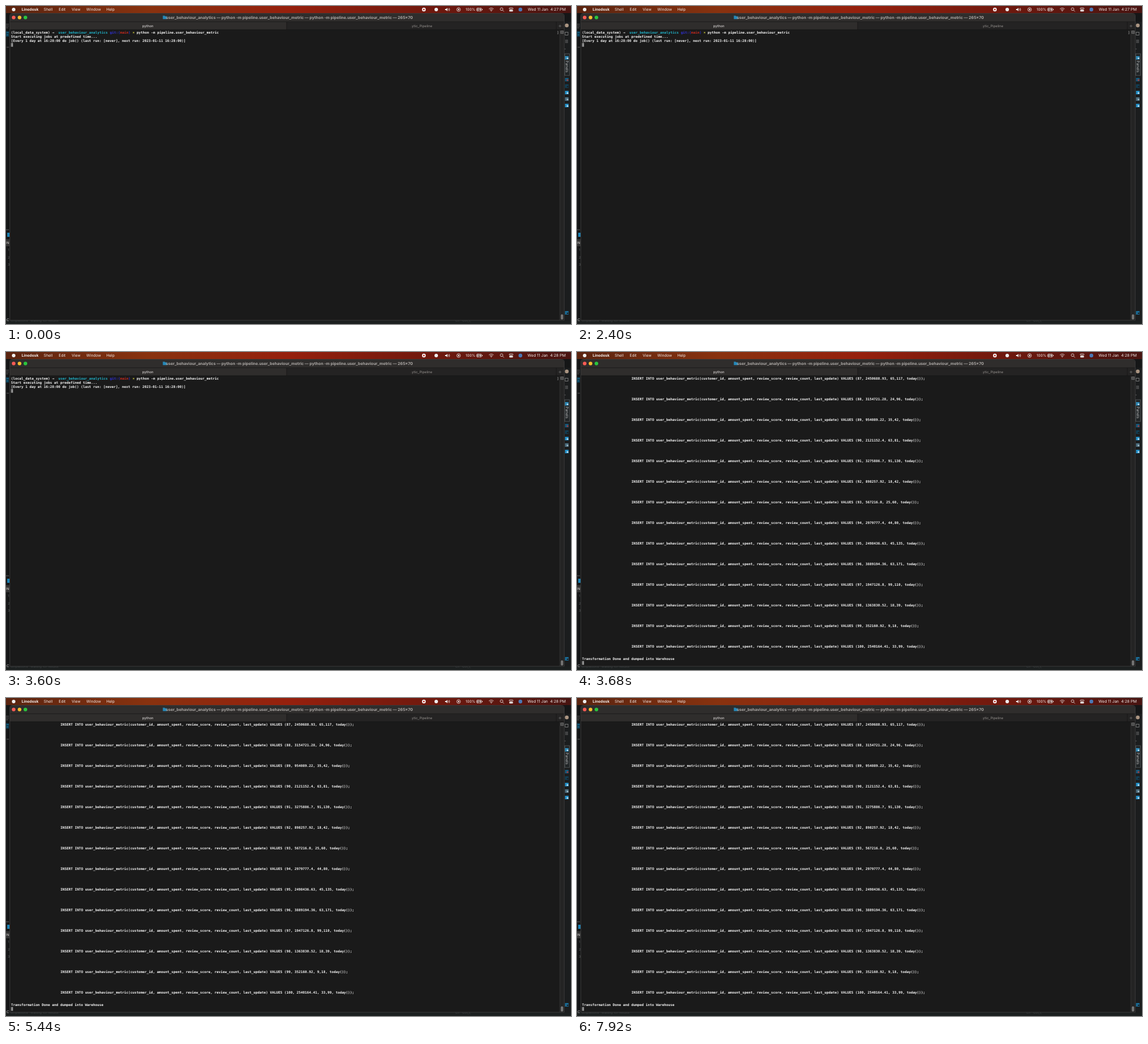
Recreate the animation shown at these times as an HTML page. Size 960 by 540 pixels, loop 8 s.

```html
<!DOCTYPE html>
<html lang="en">
<head>
<meta charset="utf-8">
<title>Scheduled job</title>
<style>
  html, body { margin: 0; width: 100%; height: 100%; overflow: hidden; background: #151617; }
  svg { display: block; width: 960px; height: 540px; }
  text { font: 6.5px Inter, "Open Sans", sans-serif; fill: #f2eeec; white-space: pre; text-rendering: geometricPrecision; }
  #screen text { font: bold 5.815px "DejaVu Sans Mono", "Liberation Mono", monospace; fill: #f4f4f4; }
  #menu .app { font-weight: 700; }
  .title { font-size: 6.72px; font-weight: 700; fill: #aeaaa7; }
  .tab { font-size: 5.8px; }
  .dim { font-size: 5.6px; fill: #55595b; }
  .line { fill: none; stroke: #eee; stroke-width: .8; }
</style>
</head>
<body>
<svg viewBox="0 0 960 540">
  <defs>
    <linearGradient id="bar">
      <stop offset="0" stop-color="#5a2410"/>
      <stop offset=".25" stop-color="#88320f"/>
      <stop offset=".5" stop-color="#96200d"/>
      <stop offset=".75" stop-color="#70190e"/>
      <stop offset="1" stop-color="#481411"/>
    </linearGradient>
  </defs>

  <!-- desktop behind the window -->
  <rect width="960" height="540" fill="#151617"/>
  <rect y="534" width="960" height="6" fill="#1c2020"/>
  <g id="edge">
    <path d="M0 31H5M0 34H5M0 37H4" stroke="#777" stroke-width=".7"/>
    <rect y="43" width="5" height="9" fill="#0c3a50"/>
    <path d="M1 45H5M1 49H4" stroke="#2583ad" stroke-width=".8"/>
    <path d="M1 70H5M0 380H5" stroke="#777" stroke-width=".7"/>
    <rect x="2" y="385" width="4" height="7" fill="#1c82b4"/>
    <rect y="396" width="6" height="12" fill="#333"/>
    <text x="1" y="403.7" style="font-size:5.5px">N</text>
    <text class="dim" x="3" y="416">1</text>
    <text class="dim" x="3" y="429">2</text>
    <text class="dim" x="3" y="441">3</text>
  </g>
  <text class="dim" x="8" y="536" fill-opacity=".6">ompletions   waiting for results</text>
  <text class="dim" x="764" y="536" fill-opacity=".6">Ln   Col_1,</text>

  <!-- menu bar -->
  <g id="menu">
    <rect width="960" height="12" fill="url(#bar)"/>
    <circle cx="13" cy="6" r="3" fill="#eee"/>
    <text class="app" x="26.5" y="8.2">Linedesk</text>
    <text x="64" y="8.2">Shell</text>
    <text x="89.5" y="8.2">Edit</text>
    <text x="111.5" y="8.2">View</text>
    <text x="136.5" y="8.2">Window</text>
    <text x="170.5" y="8.2">Help</text>
    <circle cx="710" cy="6" r="3.2" fill="#f2f2f2"/>
    <rect x="708.8" y="4.8" width="2.4" height="2.4" fill="#c1271b"/>
    <circle cx="731" cy="6" r="3" fill="#eee"/>
    <path d="M746 5H748L750 3V9L748 7H746Z" fill="#eee"/>
    <path class="line" d="M751.3 4.5Q752.5 6 751.3 7.5M752.8 3.4Q755 6 752.8 8.6"/>
    <circle class="line" cx="769" cy="6" r="3.1"/>
    <path d="M768 4.3L771 6L768 7.7Z" fill="#eee"/>
    <text x="781" y="8.2" style="font-size:6.2px">100%</text>
    <rect class="line" x="799.7" y="3.6" width="8.4" height="4.8" rx="1.3"/>
    <rect x="800.8" y="4.7" width="6.2" height="2.6" fill="#ddd"/>
    <path d="M809.4 5V7" class="line"/>
    <path d="M804.5 3.5L802.6 6.4H805.2L803.4 9" fill="none" stroke="#4b1a12" stroke-width=".8"/>
    <path class="line" d="M820.5 5Q824.5 1.8 828.5 5M822 6.6Q824.5 4.6 827 6.6"/>
    <path d="M823.2 7.8Q824.5 6.8 825.8 7.8L824.5 9Z" fill="#eee"/>
    <path class="line" d="M843.8 7.2L846 9.4"/>
    <circle class="line" cx="842" cy="5.3" r="2.3"/>
    <rect class="line" x="855" y="3.2" width="6.5" height="2.2" rx="1.1"/>
    <rect x="855" y="6.5" width="6.5" height="2.7" rx="1.3" fill="#eee"/>
    <circle cx="874" cy="6" r="3.2" fill="#4b78b5"/>
    <text id="clock" x="951" y="8.2" text-anchor="end" style="font-size:6.65px"></text>
  </g>

  <!-- side panel -->
  <g id="panel">
    <rect x="949" y="27" width="11" height="507" fill="#1b1d1e"/>
    <circle cx="952.8" cy="33" r="3.2" fill="#aa9481"/>
    <rect x="950" y="44.5" width="5" height="5" fill="none" stroke="#888" stroke-width=".8"/>
    <path d="M950 58H955M950 60H955M950 62H955" stroke="#888" stroke-width=".7"/>
    <path d="M949 73H951" stroke="#777" stroke-width=".7"/>
    <rect x="949.5" y="81" width="8" height="37" fill="#202426" stroke="#606466" stroke-width=".7"/>
    <text transform="translate(950.6 92.5) rotate(90)" style="font-size:6.5px;fill:#bbb">Panels</text>
  </g>

  <!-- window -->
  <path d="M6.5 533.7V17Q6.5 12.5 11 12.5H943.5Q948.5 12.5 948.5 17V533.7Z" fill="#1a1a1a" stroke="#404040" stroke-width=".8"/>
  <path d="M7 40V17Q7 13 11 13H943.5Q948 13 948 17V40Z" fill="#2f2d2c"/>
  <path d="M477 27H948V40H477Z" fill="#242323"/>
  <path d="M7 26.8H948M7 40.3H948M476.8 27V40M935 27V40" stroke="#151515" stroke-width=".7"/>
  <circle cx="13" cy="19.5" r="3.1" fill="#fc5b55"/>
  <circle cx="23" cy="19.5" r="3.1" fill="#fcbb2d"/>
  <circle cx="33" cy="19.5" r="3.1" fill="#2ac53e"/>
  <path d="M266.5 16.5H269.5L270.4 17.4H273.5V22.3H266.5Z" fill="#2588b8"/>
  <text class="title" x="481.5" y="21.9" text-anchor="middle">user_behaviour_analytics — python -m pipeline.user_behaviour_metric — python -m pipeline.user_behaviour_metric — 265×70</text>
  <text class="tab" x="241" y="35.8" text-anchor="middle">python</text>
  <text class="tab" x="706" y="35.8" text-anchor="middle" style="fill:#96928f">.ytic_Pipeline</text>
  <path d="M939 34H943.6M941.3 31.7V36.3" stroke="#777" stroke-width=".7"/>
  <rect x="941" y="41" width="7" height="492" fill="#242424"/>
  <path d="M941 41V533" stroke="#3c3c3c" stroke-width=".7"/>
  <rect x="942.8" y="42.3" width="4" height="4.4" fill="none" stroke="#8a8a8a" stroke-width=".8"/>
  <path d="M943 44.5H946.6" stroke="#8a8a8a" stroke-width=".7"/>
  <rect x="942.7" y="523.5" width="4" height="9" rx="2" fill="#777"/>
  <text x="1" y="535.3" style="font-size:6px;fill:#ccc">C</text>

  <g id="screen">
    <g id="waiting"></g>
    <g id="done"></g>
    <rect id="cursor" x="8.5" width="3.5" height="6.4" fill="#8c8c8c"/>
  </g>
</svg>
<script>
const LOOP = 8000, MINUTE_AT = 2960, OUTPUT_AT = 3680;
const CELL = 3.5, LINE = 7, LEFT = 8.5, BASE = 47.1;
const $ = id => document.getElementById(id);

function add(parent, tag, attrs, content = "") {
  const el = document.createElementNS("http://www.w3.org/2000/svg", tag);
  for (const key in attrs) el.setAttribute(key, attrs[key]);
  el.textContent = content;
  return parent.appendChild(el);
}

function print(parent, col, row, content, color = "#f4f4f4") {
  add(parent, "text", { x: LEFT + col * CELL, y: BASE + row * LINE, style: `fill:${color}` }, content);
}

// prompt and schedule
const waiting = $("waiting"), done = $("done");
print(waiting, 0, 0, "(local_data_system)");
print(waiting, 20, 0, "→");
print(waiting, 23, 0, "user_behaviour_analytics", "#20b2c8");
print(waiting, 48, 0, "git:(", "#3030d8");
print(waiting, 53, 0, "main", "#c92a20");
print(waiting, 57, 0, ")", "#3030d8");
print(waiting, 59, 0, "×", "#c9c53a");
print(waiting, 61, 0, "python -m pipeline.user_behaviour_metric");
print(waiting, 265, 0, "]", "#999");
print(waiting, 0, 1, "Start executing jobs at predefined time...");
print(waiting, 0, 2, "[Every 1 day at 16:28:00 do job() (last run: [never], next run: 2023-01-11 16:28:00)]");

// job output
const metrics = [
  "2450688.93, 65,117", "3154721.28, 24,96", "954089.22, 35,42", "2121152.4, 63,81",
  "3275886.7, 91,130", "898257.92, 18,42", "567216.0, 25,60", "2979777.4, 44,80",
  "2498436.63, 45,135", "3889194.36, 63,171", "1947126.8, 99,110", "1363830.52, 18,39",
  "352160.92, 9,18", "2540164.41, 33,99"
];
const insert = "INSERT INTO user_behaviour_metric(customer_id, amount_spent, review_score, review_count, last_update) VALUES";
metrics.forEach((m, i) => print(done, 24, i * 5, `${insert} (${87 + i}, ${m}, today());`));
print(done, 0, 68, "Transformation Done and dumped into Warehouse");

// side panel icons: a coloured tile with a small accent
function icon(y, color, accent) {
  add($("panel"), "rect", { x: 949.8, y: y - 3, width: 6, height: 6, fill: color });
  add($("panel"), "rect", { x: 952.8, y: y - 0.3, width: 2.6, height: 2.2, fill: accent });
}
icon(88, "#2b86b4", "#cfe2ec");
icon(125, "#17587a", "#b5332f");
icon(136, "#123e54", "#1b1d1e");
icon(147, "#2590c8", "#d8e8f0");
icon(158, "#4d6f80", "#a8bcc6");
icon(169, "#2590c8", "#d8e8f0");
icon(521, "#1a6d98", "#1b1d1e");

function draw(now) {
  const t = now % LOOP, finished = t >= OUTPUT_AT;
  $("clock").textContent = `Wed 11 Jan  4:${t < MINUTE_AT ? 27 : 28} PM`;
  waiting.style.display = finished ? "none" : "";
  done.style.display = finished ? "" : "none";
  $("cursor").setAttribute("y", finished ? 524.8 : 62.8);
  requestAnimationFrame(draw);
}
draw(0);
</script>
</body>
</html>
```
